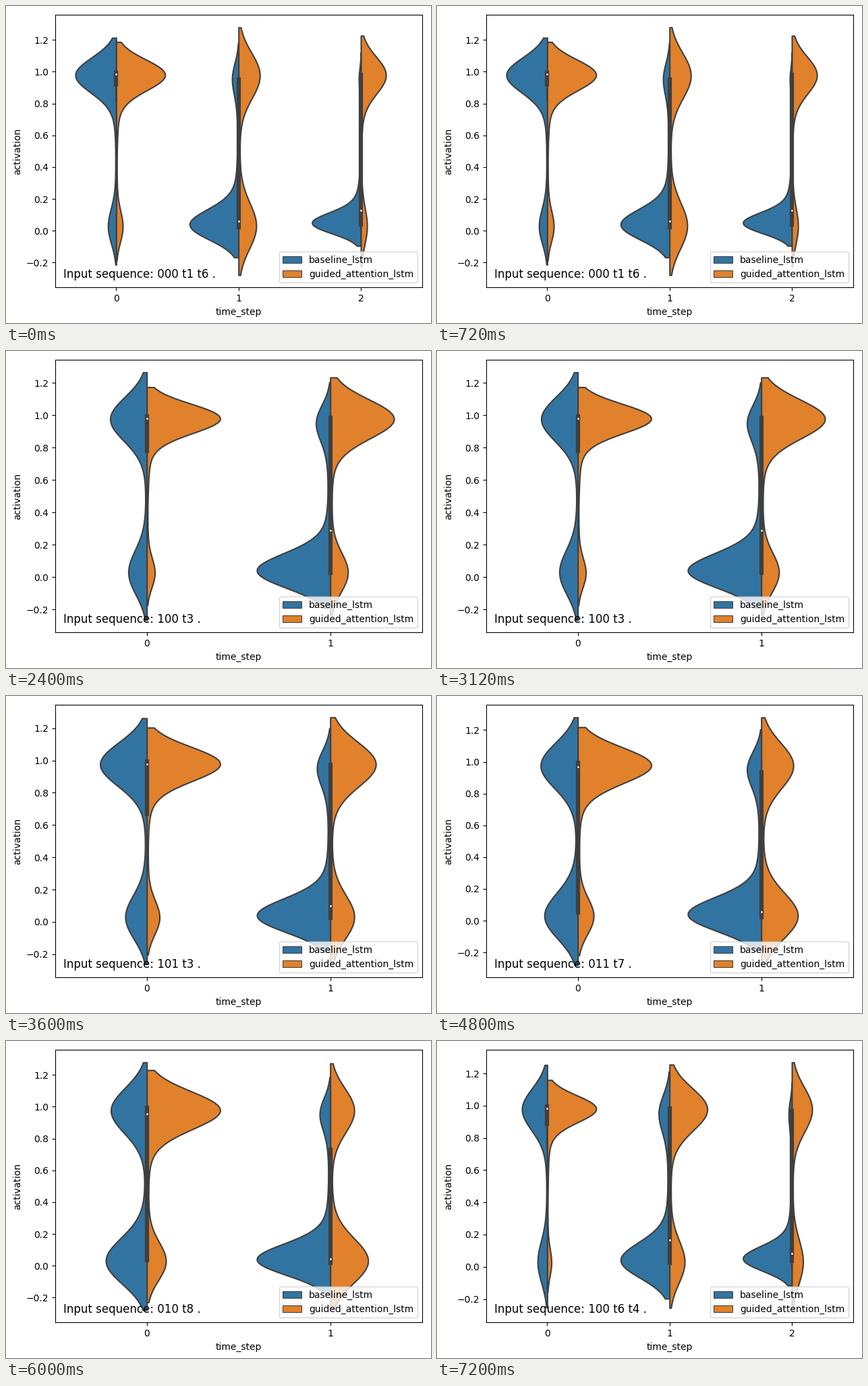
Write a matplotlib script that moves like this. It is 630 by 470 pixels and loops after 8000 ms.

```python
import numpy as np
import matplotlib.pyplot as plt
from matplotlib.animation import FuncAnimation
from matplotlib.patches import Patch

W, H, DPI = 630, 470, 100
BLUE, ORANGE, GRAY = "#3274a1", "#e1812c", "#3f3f3f"
HALF_WIDTH = 0.4
LINE = 1.5
SAMPLES = 400
TICK_MS, TICKS, TICKS_PER_SCENE = 400, 20, 3

# Sequence, then per time step the share of units that are on: (left, right).
SCENES = (
    ("000 t1 t6", (0.83, 0.88), (0.13, 0.54), (0.05, 0.80)),
    ("011 t4 t7", (0.64, 0.92), (0.15, 0.53), (0.08, 0.48)),
    ("100 t3", (0.66, 0.90), (0.18, 0.78)),
    ("101 t3", (0.68, 0.85), (0.17, 0.65)),
    ("011 t7", (0.52, 0.82), (0.18, 0.46)),
    ("010 t8", (0.46, 0.79), (0.14, 0.38)),
    ("100 t6 t4", (0.72, 0.92), (0.20, 0.71), (0.08, 0.64)),
)


def tail(count, scale):
    """Evenly ranked values from 0 to 1, crowded at 0 with a long thin tail."""
    u = (np.arange(count) + 0.5) / count / (1 + scale)
    return scale * u / (1 - u)


def activations(on_share, drift):
    """Units close to 1 and close to 0; drift pulls both groups inwards."""
    on = round(SAMPLES * on_share)
    high = 1 - tail(on, 0.012 + 0.04 * drift)
    low = 0.014 * drift + tail(SAMPLES - on, 0.018)
    return np.concatenate([high, low])


def density(data):
    """Gaussian kernel estimate, cut two bandwidths beyond the data."""
    bandwidth = data.std(ddof=1) * len(data) ** -0.2
    y = np.linspace(data.min() - 2 * bandwidth, data.max() + 2 * bandwidth, 100)
    z = (y[:, None] - data) / bandwidth
    return y, np.exp(-0.5 * z ** 2).mean(axis=1) / bandwidth


fig = plt.figure(figsize=(W / DPI, H / DPI), dpi=DPI, facecolor="white")
ax = fig.add_axes([72.7 / W, 52.7 / H, 544 / W, 404 / H])


def draw_box(x, data):
    q1, median, q3 = np.percentile(data, [25, 50, 75])
    reach = 1.5 * (q3 - q1)
    inside = data[(data >= q1 - reach) & (data <= q3 + reach)]
    ax.plot([x, x], [inside.min(), inside.max()], color=GRAY, linewidth=LINE)
    ax.plot([x, x], [q1, q3], color=GRAY, linewidth=3 * LINE)
    ax.scatter(x, median, s=(2 * LINE) ** 2, color="white",
               edgecolor=GRAY, zorder=3)


def draw_violin(x, left_share, right_share):
    left = activations(left_share, drift=x)
    right = activations(right_share, drift=0)
    curves = [density(left), density(right)]
    peak = max(width.max() for _, width in curves)
    for (y, width), side, color in zip(curves, (-1, 1), (BLUE, ORANGE)):
        ax.fill_betweenx(y, x, x + side * HALF_WIDTH * width / peak,
                         facecolor=color, edgecolor=GRAY, linewidth=LINE)
    draw_box(x, np.concatenate([left, right]))


def update(tick):
    sequence, *steps = SCENES[tick // TICKS_PER_SCENE]
    ax.clear()
    for x, shares in enumerate(steps):
        draw_violin(x, *shares)
    ax.set_xlim(-0.5, len(steps) - 0.5)
    ax.set_xticks(range(len(steps)))
    ax.set_xlabel("time_step")
    ax.set_ylabel("activation")
    ax.text(85.2 / W, 67 / H, f"Input sequence: {sequence} .", fontsize=12,
            transform=fig.transFigure)
    ax.legend(handles=[
        Patch(facecolor=color, edgecolor=GRAY, linewidth=LINE / 2, label=label)
        for color, label in ((BLUE, "baseline_lstm"),
                             (ORANGE, "guided_attention_lstm"))
    ], loc="lower right")
    return []


anim = FuncAnimation(fig, update, frames=TICKS, interval=TICK_MS,
                     repeat=True, repeat_delay=0, blit=False)
plt.show()
```
